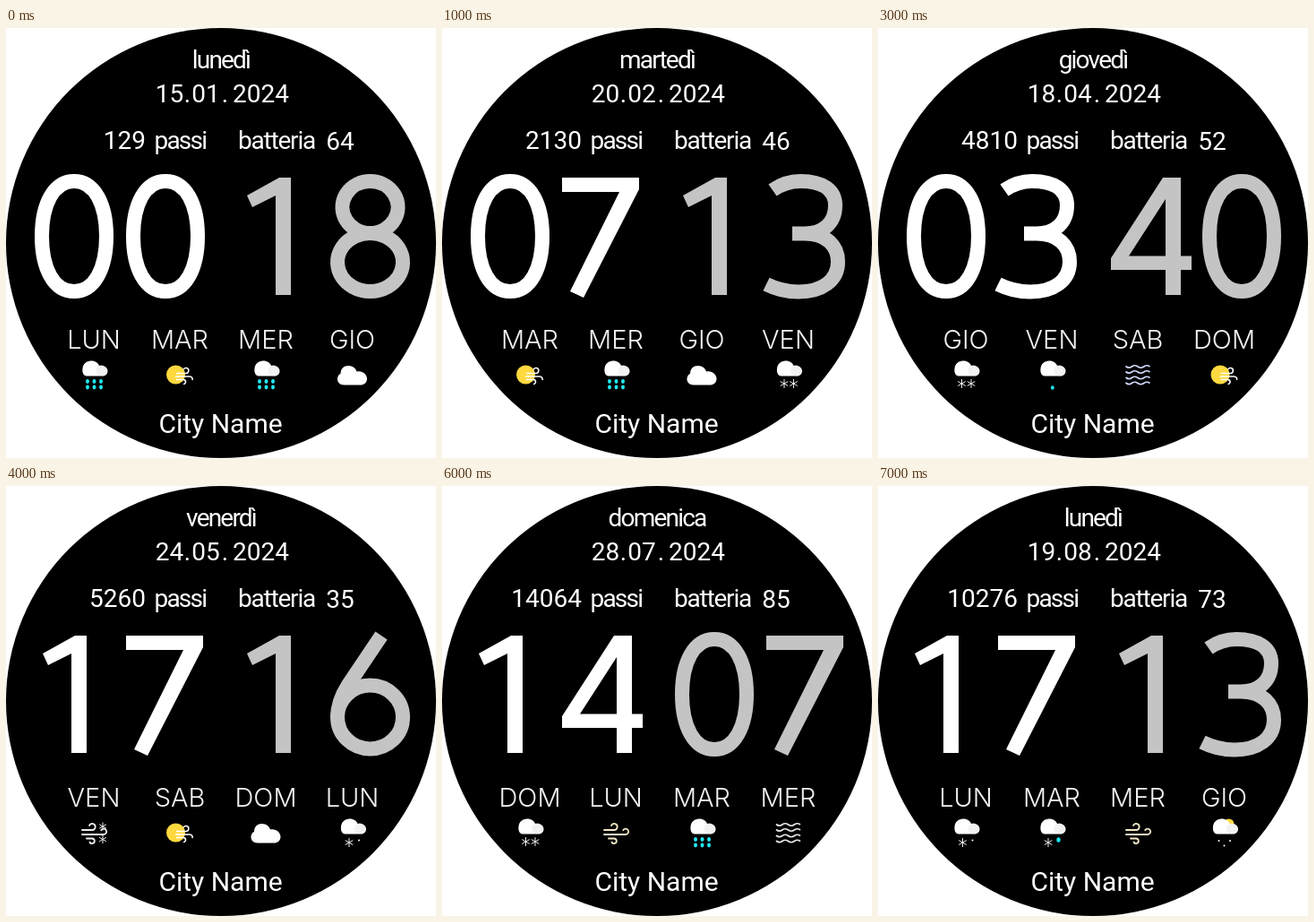
Animation, 480 px wide and 480 px high, one loop 8 s. Source, as an HTML page with a canvas:

```html
<!DOCTYPE html>
<html lang="it">
<head>
<meta charset="utf-8">
<title>Watch face</title>
<style>
html, body { margin: 0; width: 100%; height: 100%; overflow: hidden; background: #fff; }
canvas { display: block; width: 480px; height: 480px; }
</style>
</head>
<body>
<canvas id="face" width="480" height="480"></canvas>
<script>
const ctx = document.getElementById('face').getContext('2d');
const STEP = 1000;
const COLUMNS = [98, 194, 290, 386.5];
const WEEK = ['lunedì', 'martedì', 'mercoledì', 'giovedì', 'venerdì', 'sabato', 'domenica'];
const CYAN = '#1fe8ee', YELLOW = '#ffd93f', LAVENDER = '#cfd9fa', CREAM = '#f3e8c6';

const states = [
  { day: 0, date: '15.01', steps: 129, battery: 64, time: '0018', icons: 'rain sunWind rain cloud' },
  { day: 1, date: '20.02', steps: 2130, battery: 46, time: '0713', icons: 'sunWind rain cloud snow' },
  { day: 2, date: '06.03', steps: 4260, battery: 17, time: '1043', icons: 'rain snow drizzle fog' },
  { day: 3, date: '18.04', steps: 4810, battery: 52, time: '0340', icons: 'snow drizzle fog sunWind' },
  { day: 4, date: '24.05', steps: 5260, battery: 35, time: '1716', icons: 'windSnow sunWind cloud flurry' },
  { day: 5, date: '22.06', steps: 7734, battery: 94, time: '0144', icons: 'fog rain sun storm' },
  { day: 6, date: '28.07', steps: 14064, battery: 85, time: '1407', icons: 'snow wind rain mist' },
  { day: 0, date: '19.08', steps: 10276, battery: 73, time: '1713', icons: 'flurry sleet wind sunSnow' }
];

// Digit outlines, x measured from the middle of each cell
const solidDigits = {
  1: 'M14 167V298H-3V187L-29 200-35 187 1 167Z',
  4: 'M34 167V254.5H46V270H34V298H17V270H-44V257L14 167ZM17 254.5V191L-24 254.5Z',
  7: 'M-44 167H42V180L-20 301-35 294 20 183H-44Z'
};
const lineDigits = {
  0: 'M0 171C23 171 36 197 36 232.5S23 294 0 294-36 268-36 232.5-23 171 0 171Z',
  3: 'M-37 181C-27 174-16 171-6 171C19 171 33 181 33 198C33 218 19 229.5-1 229.5H-15' +
     'M-1 229.5C23 229.5 36 243 36 261C36 282 18 294.5-8 294.5C-20 294.5-32 292-44 286',
  6: 'M13 167L-24 222C-33 236-36 246-36 258A36.5 35.5 0 1 0 37 258A36.5 35.5 0 0 0-36 258',
  8: 'M.5 171a31 29 0 1 0 .01 0ZM.5 229a36.5 32.5 0 1 0 .01 0Z'
};

function at(x, y, draw) {
  ctx.save();
  ctx.translate(x, y);
  draw();
  ctx.restore();
}

function text(str, x, y, font, align = 'center', color = '#fff', spacing = 0) {
  ctx.font = font;
  ctx.textAlign = align;
  ctx.fillStyle = color;
  ctx.letterSpacing = spacing + 'px';
  ctx.fillText(str, x, y);
}

function line(path, color, width) {
  ctx.strokeStyle = color;
  ctx.lineWidth = width;
  ctx.stroke(new Path2D(path));
}

function shape(path, color) {
  ctx.fillStyle = color;
  ctx.fill(new Path2D(path), 'evenodd');
}

function dot(x, y, r, color = '#fff', ry = r) {
  ctx.fillStyle = color;
  ctx.beginPath();
  ctx.ellipse(x, y, r, ry, 0, 0, Math.PI * 2);
  ctx.fill();
}

function flake(x, y, r) {
  for (let i = 0; i < 3; i++) {
    const a = Math.PI * (i / 3 + .5), dx = r * Math.cos(a), dy = r * Math.sin(a);
    line(`M${x - dx} ${y - dy}L${x + dx} ${y + dy}`, '#eee', 1);
  }
}

function drops(xs) {
  for (const x of xs) for (const y of [7.5, 14]) dot(x, y, 2, CYAN, 2.4);
}

function smallCloud() {
  shape('M-8 1.5C-12 1-13-3-12.5-7C-12-12-8-15.5-3-15.5C2-15.5 5-13 6-10' +
        'C11-11 15.5-8 15.5-4C15.5-1 13 1.5 10 1.5Z', '#fff');
  ctx.globalAlpha = .35;
  dot(8.5, -4.5, 6, '#d9d9d9');
  ctx.globalAlpha = 1;
}

function waves(color) {
  for (const y of [-9, -3, 3.5, 9.5])
    line(`M-13.5 ${y - .5}q3.4 3 6.75.5t6.75 0t6.75 0t6.75 0`, color, 1.7);
}

function gusts(color) {
  ctx.lineCap = 'round';
  line('M-13-3H-2a3.5 3.5 0 1 0-3-5M-13 2H11a3.2 3.2 0 1 0-2.8-4.8M-8 6.5H-2a2.8 2.8 0 1 1-2.5 4', color, 1.8);
  ctx.lineCap = 'butt';
}

const icons = {
  cloud() {
    shape('M-9 11.5C-14 11.5-17 8-16.5 4C-16 1-14.5-.5-13-1C-13-7-9-10-4.5-10' +
          'C1-10 4-7 5-3.5C11-5 16.5-.5 16.5 4.5C16.5 9 13 11.5 9 11.5Z', '#fff');
  },
  rain() { smallCloud(); drops([-7, .5, 8]); },
  drizzle() { smallCloud(); dot(.8, 14.5, 1.9, CYAN, 2.3); },
  snow() { smallCloud(); flake(-4.5, 10, 5); flake(6, 10, 5); },
  flurry() { smallCloud(); flake(-3.5, 11, 5); dot(7.5, 8.5, 1); },
  sleet() { smallCloud(); flake(-4, 11, 5); dot(7.5, 8, 2.2, CYAN, 2.8); },
  sunSnow() {
    dot(5, -9.5, 6, YELLOW);
    smallCloud();
    dot(-6, 9, 1); dot(0, 14.5, 1); dot(6.5, 9, 1);
  },
  sun() { dot(-2, -3, 12.3, YELLOW); },
  sunWind() {
    dot(-4.5, 0, 10.5, YELLOW);
    line('M-4-1.5H7a3 3 0 1 0-3-4M-5 2H11a3 3 0 0 1 3 4M-4 5.5H4a2.5 2.5 0 0 1 0 5', '#fff', 1.6);
  },
  fog() { waves(LAVENDER); },
  mist() { waves('#e8e8ec'); },
  wind() { gusts(CREAM); },
  windSnow() { gusts('#eee'); flake(10, -7, 4.5); flake(10, 7.5, 4.5); },
  storm() {
    smallCloud();
    shape('M-5-7L-12 4H-7.5L-9.5 12-1 0H-5.5L-2-7Z', '#ffa12e');
    drops([-1, 5, 11]);
  }
};

function digit(d, x, color) {
  at(x, 0, () => {
    if (solidDigits[d]) shape(solidDigits[d], color);
    else line(lineDigits[d], color, 16);
  });
}

function drawFace({ day, date, steps, battery, time, icons: row }) {
  ctx.fillStyle = '#fff';
  ctx.fillRect(0, 0, 480, 480);
  dot(240, 240, 240, '#000');

  const label = '28px Roboto, sans-serif';
  text(WEEK[day], 240, 45, label, 'center', '#fff', -1.8);
  const [dd, mm] = date.split('.');
  text(dd, 182.5, 83, label);
  text('.', 202.5, 83, label);
  text(mm, 223, 83, label);
  text('.', 244.5, 83, label);
  text('2024', 284.5, 83, label);
  text(steps, 156, 135, label, 'right');
  text('passi', 165.5, 135, label, 'left', '#fff', -1.8);
  text('batteria', 259, 135, label, 'left', '#fff', -1.2);
  text(battery, 373, 136, label);

  [76, 178, 304, 406].forEach((x, i) => digit(time[i], x, i < 2 ? '#fff' : '#c4c4c4'));

  row.split(' ').forEach((name, i) => {
    const short = WEEK[(day + i) % 7].slice(0, 3).toUpperCase();
    text(short, COLUMNS[i], 357.5, '300 29px Inter, sans-serif', 'center', '#f2f2f2');
    at(COLUMNS[i], 387, icons[name]);
  });
  text('City Name', 239.5, 452, '30px Roboto, sans-serif');
}

function frame() {
  drawFace(states[Math.floor(performance.now() / STEP) % states.length]);
  requestAnimationFrame(frame);
}
frame();
</script>
</body>
</html>
```
